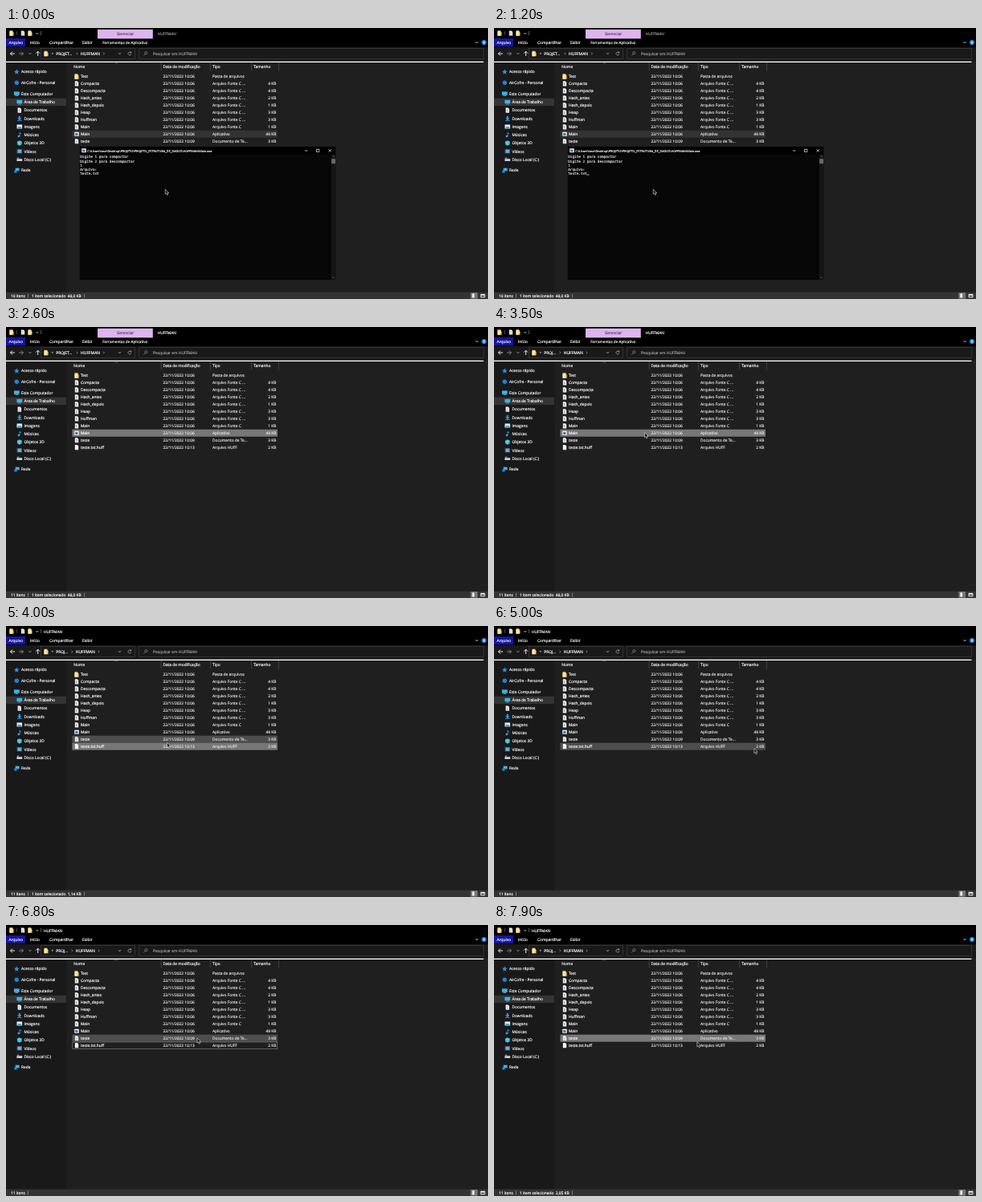
Write an HTML page that moves like this. It is 600 by 338 pixels and loops after 8000 ms.

```html
<!DOCTYPE html>
<html lang="pt">
<head>
<meta charset="utf-8">
<title>HUFFMAN</title>
<style>
  html, body { margin: 0; width: 100%; height: 100%; overflow: hidden; background: #000; }
  svg { display: block; width: 600px; height: 338px; }
  text {
    font: 4.85px "Open Sans", "Noto Sans", sans-serif; white-space: pre; text-rendering: geometricPrecision;
    color: #fff; fill: currentColor; stroke: currentColor; stroke-width: .17px;
  }
  .mono { font: 4.35px "DejaVu Sans Mono", "Liberation Mono", monospace; color: #ddd; }
</style>
</head>
<body>
<svg viewBox="0 0 600 338">
  <g id="base"></g>
  <g id="live"></g>
</svg>
<script>
const LOOP = 8000, STEP = 100, ROW_TOP = 56, ROW_H = 8.97;
const MAIN = 8, TXT = 9, HUFF = 10;

const files = [
  ["Test", "10:06", "Pasta de arquivos", "", "folder"],
  ["Compacta", "10:06", "Arquivo Fonte C ...", "4 KB", "code"],
  ["Descompacta", "10:06", "Arquivo Fonte C ...", "4 KB", "code"],
  ["Hash_antes", "10:06", "Arquivo Fonte C ...", "2 KB", "code"],
  ["Hash_depois", "10:06", "Arquivo Fonte C ...", "1 KB", "code"],
  ["Heap", "10:06", "Arquivo Fonte C ...", "3 KB", "code"],
  ["Huffman", "10:06", "Arquivo Fonte C ...", "3 KB", "code"],
  ["Main", "10:06", "Arquivo Fonte C", "1 KB", "code"],
  ["Main", "10:06", "Aplicativo", "49 KB", "app"],
  ["teste", "10:09", "Documento de Te...", "3 KB", "notes"],
  ["teste.txt.huff", "10:13", "Arquivo HUFF", "2 KB", "page"]
];

const places = [
  ["Acesso rápido", 54.6, 19, "star"],
  ["AirCofre - Personal", 68.3, 19, "dot"],
  ["Este Computador", 82, 19, "screen"],
  ["Área de Trabalho", 92.4, 22.5, "screen"],
  ["Documentos", 102.6, 22.5, "notes"],
  ["Downloads", 112.8, 22.5, "down"],
  ["Imagens", 123, 22.5, "image"],
  ["Músicas", 133.3, 22.5, "note"],
  ["Objetos 3D", 143.5, 22.5, "cube"],
  ["Vídeos", 153.8, 22.5, "film"],
  ["Disco Local (C:)", 164, 22.5, "disk"],
  ["Rede", 177.7, 19, "net"]
];

// [from time, value]
const selection = [[0, MAIN], [4000, HUFF], [5000, -1], [7300, TXT]];
const focus = [[0, -1], [5000, HUFF], [7300, -1]];
const status = [[0, "48,0 KB"], [4000, "1,14 KB"], [5000, ""], [7700, "2,05 KB"]];
const caret = [[0, 0], [100, 1], [600, 0], [1200, 1]];

// [time, x, y] of the pointer tip
const pathIn = [[0, 198.2, 201.2], [1300, 198.2, 201.2]];
const path = [
  [2900, 250, 322], [3500, 187.5, 131.8], [3700, 187.5, 131.8], [4100, 205, 150],
  [4200, 205, 150], [4500, 323.8, 152.5], [5000, 323.8, 152.5], [5400, 351, 134],
  [5800, 344, 155], [6100, 306.8, 174.2], [6700, 238, 141], [7600, 238, 141], [7900, 252.8, 145.7]
];

const rect = (x, y, w, h, fill, extra = "") =>
  `<rect x="${x}" y="${y}" width="${w}" height="${h}" fill="${fill}" ${extra}/>`;
const frame = (x, y, w, h, color, width = .6) =>
  rect(x, y, w, h, "none", `stroke="${color}" stroke-width="${width}"`);
const line = (d, color = "#fff", width = .7) =>
  `<path d="${d}" fill="none" stroke="${color}" stroke-width="${width}"/>`;
const shape = (d, fill) => `<path d="${d}" fill="${fill}"/>`;
const circle = (x, y, r, fill) => `<circle cx="${x}" cy="${y}" r="${r}" fill="${fill}"/>`;
// y is the middle of the line of text
const text = (s, x, y, style = "", cls = "") =>
  `<text x="${x}" y="${y + 1.7}" class="${cls}" style="${style}">${s}</text>`;

const down = (x, y, color = "#ddd") => line(`M${x - 1.5} ${y - .8}l1.5 1.6 1.5-1.6`, color, .8);
const right = (x, y) => line(`M${x - .7} ${y - 1.4}l1.4 1.4-1.4 1.4`, "#ccc", .6);

const sheet = (x, y) => shape(`M${x - 2.2} ${y - 3.1}h2.9l1.5 1.5v4.7h-4.4z`, "#f4f4f4");
const icons = {
  folder: (x, y) => shape(`M${x - 2.5} ${y - 3.2}h3.6l1.4 2.4v4h-5z`, "#f3cf70") + rect(x - 2.5, y - 2.2, 3, 5.4, "#ffe9ad"),
  page: sheet,
  code: (x, y) => sheet(x, y) + line(`M${x + .9} ${y - .8}h-1.6v2h1.6`, "#5b6f88", .6),
  notes: (x, y) => sheet(x, y) + line(`M${x - 1.3} ${y - .8}h2.6M${x - 1.3} ${y + .5}h2.6M${x - 1.3} ${y + 1.8}h2.6`, "#8a9bb0", .5),
  app: (x, y) => rect(x - 2.8, y - 2.5, 5.6, 5, "#f2f5f8") + rect(x - 1.8, y - 1.1, 3.2, 2.7, "#2d6ea8"),
  star: (x, y) => shape(`M${x} ${y - 3.2}l1 2.2 2.3.2-1.8 1.6.6 2.4-2.1-1.3-2.1 1.3.6-2.4-1.8-1.6 2.3-.2z`, "#2f8fdc"),
  dot: (x, y) => circle(x, y, 2.7, "#1a86d9"),
  screen: (x, y) => rect(x - 3.4, y - 2.6, 6.8, 4.4, "#35b4ee") + rect(x - 1.8, y + 2.2, 3.6, .8, "#9ac"),
  down: (x, y) => shape(`M${x - 1} ${y - 3}h2v2.6h1.8l-2.8 2.8-2.8-2.8h1.8z`, "#2f9df0") + rect(x - 2.8, y + 2.4, 5.6, .8, "#2f9df0"),
  image: (x, y) => rect(x - 3.3, y - 2.5, 6.6, 5, "#e4f2fb") + shape(`M${x - 2.8} ${y + 2}l2-2.8 1.4 1.6 1-1 1.4 2.2z`, "#3b9bd6"),
  note: (x, y) => circle(x - .9, y + 1.8, 1.4, "#2aa5ee") + line(`M${x + .2} ${y + 1.8}v-4.6l2 1.4`, "#2aa5ee", .9),
  cube: (x, y) => shape(`M${x} ${y - 3.2}l2.9 1.5v3.4l-2.9 1.5-2.9-1.5v-3.4z`, "#35b8d8") + line(`M${x - 2.6} ${y - 1.5}l2.6 1.3 2.6-1.3M${x} ${y - .2}v3`, "#c8f4ff", .5),
  film: (x, y) => rect(x - 3.2, y - 2.6, 6.4, 5.2, "#59616c") + rect(x - 2, y - 2, 4, 4, "#62b5e8"),
  disk: (x, y) => rect(x - 3.4, y - .8, 6.8, 2.8, "#c9ced3") + rect(x - 3, y - 2.4, 2.4, 1.4, "#35a4e8"),
  net: (x, y) => rect(x - 1.6, y - 3, 4.8, 3.6, "#3fb6f0") + circle(x - 1.4, y + 1.2, 1.9, "#2b7fc4")
};

function drawBase() {
  const out = [
    rect(0, 0, 600, 338, "#1f1f1f"),
    rect(0, 0, 600, 24, "#000"),
    rect(0, 13, 24.3, 10.3, "#15159c"),
    icons.folder(7, 6.5), rect(13.2, 4, .5, 5, "#888"),
    icons.notes(21, 6.5), icons.folder(30, 6.5), down(38.8, 6.8), rect(43.4, 4, .5, 5, "#aaa"),
    text("Arquivo", 3.6, 18.3), text("Início", 30, 18.3),
    text("Compartilhar", 54, 18.3), text("Exibir", 95, 18.3),
    down(586, 18, "#fff"), circle(595, 18, 3, "#1e8fe6"),
    text("?", 595, 18, "font-size:4.4px;font-weight:700;text-anchor:middle"),
    rect(0, 24, 600, 18, "#191919"),
    line("M11 32H5.5M8 29.5L5.5 32 8 34.5", "#fff", .9),
    line("M16 32h5.5M19 29.5l2.5 2.5-2.5 2.5", "#999", .8),
    down(30, 32, "#aaa"),
    line("M39.7 35v-5.8M37.3 31.6l2.4-2.4 2.4 2.4", "#fff", .9),
    frame(43.3, 25.4, 117.2, 13, "#444"), frame(165.8, 25.4, 429, 13, "#444"),
    icons.folder(50, 32), text("«", 56.5, 31.7, "color:#ccc"),
    down(141.5, 32, "#ccc"), line("M155.6 30.8a2 2 0 1 0 .3 1.9M155.8 29.3v1.7h-1.7", "#ccc", .6),
    `<circle cx="174.3" cy="31.2" r="1.6" fill="none" stroke="#aaa" stroke-width=".6"/>`,
    line("M173.2 32.5l-2 2", "#aaa", .6),
    text("Pesquisar em HUFFMAN", 183, 32, "color:#a0a0a0"),
    rect(0, 42, 75.5, 288, "#191919"),
    rect(0, 41.7, 594.5, 1.3, "#fff"),
    rect(0, 87.7, 75, 9.4, "#343434"),
    line("M135.8 44.4l1.6-1.3 1.6 1.3", "#aaa", .5),
    text("Nome", 84.3, 48.2), text("Data de modificação", 195.4, 48.2),
    text("Tipo", 257, 48.2), text("Tamanho", 308.3, 48.2),
    ...[192.8, 254.2, 305.3, 339.3].map(x => rect(x, 43, .6, 10.5, "#555")),
    ...places.map(([name, y, x, icon]) => icons[icon](x - 5.7, y) + text(name, x, y)),
    rect(0, 329.6, 600, 8.4, "#333"),
    rect(27.5, 331.5, .5, 5, "#ccc"),
    rect(578.4, 330, 8.6, 7.6, "#777"), rect(580.4, 331.4, 2.6, 5, "#fff"),
    rect(590.6, 331.8, 5.8, 4.4, "#f0f0f0"), rect(591.5, 333.7, 4, 1.5, "#333")
  ];
  return out.join("");
}

function drawConsole(t) {
  const lines = ["Digite 1 para compactar", "Digite 2 para descompactar", "1", "Arquivo:", "teste.txt"];
  const title = "C:\\Users\\tavo\\Desktop\\PROJETO\\PROJETO_ESTRUTURA_DE_DADOS\\HUFFMAN\\Main.exe";
  return [
    rect(91.8, 148, 318.4, 166, "#000"),
    rect(92, 157.4, 318, 156.4, "#070707"),
    rect(404.8, 157.4, 5.4, 156.4, "#151515"), rect(405.2, 163.2, 4.8, 6, "#6a6a6a"),
    line("M406.4 161l1.2-1.3 1.2 1.3M406.4 310.6l1.2 1.3 1.2-1.3", "#999", .5),
    icons.app(97, 152.8),
    text(title, 101.3, 152.8, "font-size:3.8px"),
    line("M371.8 153h3.8M401.6 151.2l3.4 3.4M405 151.2l-3.4 3.4", "#fff", .7),
    frame(386.6, 151.2, 3.4, 3.4, "#fff", .6),
    ...lines.map((s, i) => text(s, 92.2, 160.6 + i * 5.28, "", "mono")),
    at(caret, t) ? rect(115.6, 182.6, 2.7, .9, "#ddd") : ""
  ].join("");
}

const at = (steps, t) => steps.filter(s => s[0] <= t).pop()[1];

function pointer(t) {
  const keys = t < 1400 ? pathIn : path;
  if (t < keys[0][0]) return null;
  const next = keys.findIndex(k => k[0] > t);
  if (next < 0) return keys[keys.length - 1].slice(1);
  const [t0, x0, y0] = keys[next - 1], [t1, x1, y1] = keys[next];
  const k = (t - t0) / (t1 - t0);
  return [x0 + (x1 - x0) * k, y0 + (y1 - y0) * k];
}

const drawPointer = ([x, y]) =>
  `<path transform="translate(${x} ${y})" d="M0 0v6l1.4-1.2 1 2.3 1.2-.5-1-2.2h1.9z" fill="#111" stroke="#ddd" stroke-width=".6"/>`;

function drawRows(t, tip) {
  const count = t < 2600 ? 10 : 11;
  const selected = at(selection, t), focused = at(focus, t);
  const over = tip && t > 1400 && tip[0] > 82 && tip[0] < 338 ? Math.floor((tip[1] - ROW_TOP) / ROW_H) : -1;
  return files.slice(0, count).map(([name, time, type, size, icon], i) => {
    const top = ROW_TOP + i * ROW_H, y = top + 4.5;
    let back = "";
    if (i === selected) back = rect(82.4, top, 255.6, ROW_H, t < 1500 ? "#333" : "#777");
    else if (i === over) back = rect(82.4, top, 255.6, ROW_H, "#4d4d4d");
    else if (i === focused) back = frame(82.7, top + .3, 255, ROW_H - .6, "#8a8a8a");
    const detail = "color:#e4e4e4";
    return back + icons[icon](88, y) + text(name, 93, y) +
      text("22/11/2022 " + time, 195.4, y, detail) + text(type, 257, y, detail) +
      text(size, 336.3, y, detail + ";text-anchor:end");
  }).join("");
}

function drawChrome(t) {
  const tools = t < 4000, short = t >= 2700, size = at(status, t);
  const shift = short ? -6.3 : 0;
  return [
    tools ? rect(114, 1.8, 68.8, 11.5, "#deb4f0") +
      text("Gerenciar", 148.6, 7.6, "color:#543a62;text-anchor:middle;font-size:4.7px") +
      text("Ferramentas de Aplicativo", 120.2, 18.3, "font-size:4.65px") : "",
    text("HUFFMAN", tools ? 188.7 : 47, 6.8, t < 1500 ? "color:#999" : ""),
    text(short ? "PROJ..." : "PROJET...", 62.3, 32), right(88.5 + shift, 32),
    text("HUFFMAN", 93 + shift, 32, "font-size:5.05px"), right(121.8 + shift, 32),
    text(t < 2600 ? "10 itens" : "11 itens", 6, 334),
    size ? text("1 item selecionado", 32, 334) + text(size, 76.8, 334) + rect(97.2, 331.5, .5, 5, "#ccc") : ""
  ].join("");
}

const live = document.getElementById("live");
document.getElementById("base").innerHTML = drawBase();

let shown = -1;
function tick() {
  const t = Math.floor(performance.now() % LOOP / STEP) * STEP;
  if (t !== shown) {
    shown = t;
    const tip = pointer(t);
    live.innerHTML = drawChrome(t) + drawRows(t, tip) +
      (t < 1400 ? drawConsole(t) : "") + (tip ? drawPointer(tip) : "");
  }
  requestAnimationFrame(tick);
}
tick();
</script>
</body>
</html>
```
